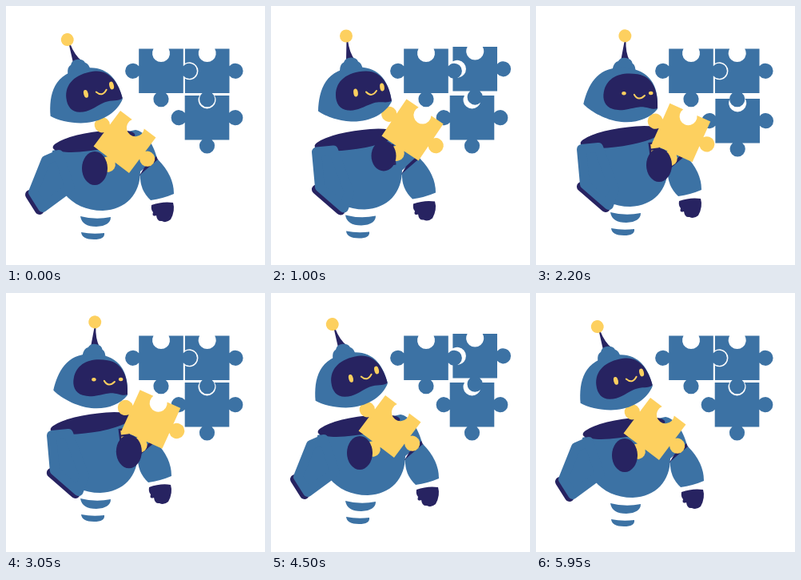
These frames come from a looping animation (324x324 px, 6000 ms). An HTML page:

```html
<!DOCTYPE html>
<html lang="en">
<head>
<meta charset="utf-8">
<title>Robot with puzzle</title>
<style>
  html, body { margin: 0; width: 100%; height: 100%; overflow: hidden; background: #fff; }
  svg { display: block; width: 100%; height: 100%; }
  .blue { fill: #3c72a4; }
  .navy { fill: #272361; }
  .gold { fill: #fdd05f; }
  #arm { stroke: #3c72a4; }
  #elbow { stroke: #272361; }
  #arm, #elbow { stroke-width: 12; stroke-linejoin: round; stroke-linecap: round; }
</style>
</head>
<body>
<svg viewBox="0 0 324 324">
  <g id="puzzle" class="blue"></g>
  <g id="robot">
    <g class="blue">
      <path d="M93 263Q112 268 131 264Q131 275 113 276Q95 276 93 263Z"/>
      <path d="M94 283Q108 286 123 284Q124 292 110 292Q95 292 94 283Z"/>
    </g>
    <g id="body">
      <path id="grip" class="navy" d="M182 249Q196 244 209 246Q212 256 206 267Q200 272 195 269Q189 270 188 262Q182 264 184 258Q181 255 182 249Z"/>
      <path class="blue" d="M58 181C56 225 80 256 121 256C150 255 168 235 168 207L189 190C184 172 174 157 162 155L110 166Z"/>
      <path class="navy" d="M167 212L173 202L188 188L192 196Q182 203 171 212Z"/>
      <path class="blue" d="M190 192Q210 212 210 235Q196 241 181 243Q167 230 168 211Q177 203 190 192Z"/>
      <ellipse class="navy" rx="52" ry="11.5" transform="translate(110 169) rotate(-9)"/>
      <g transform="translate(152 188) rotate(-7)">
        <rect class="navy" x="-7" y="-13" width="14" height="26"/>
        <g id="bars" class="gold"></g>
      </g>
    </g>
    <polyline id="elbow"/>
    <polygon id="arm" class="blue"/>
    <path id="held" class="gold"/>
    <ellipse id="hand" class="navy"/>
    <g id="head">
      <g id="antenna">
        <path class="navy" d="M94.5 44L96 44Q98 60 105 69L94 69Z"/>
        <circle class="gold" cx="94" cy="39" r="8"/>
      </g>
      <path class="blue" d="M86 83Q86 74 91 72Q93 66 100 66Q107 66 109 71Q114 73 115 82Z"/>
      <path class="blue" d="M59 133C60 106 68 79 108 78C136 77 148 97 151 121C143 136 125 146 103 146C88 146 68 140 59 133Z"/>
      <path class="navy" d="M81 113C81 95 95 84 118 83C138 82 148 100 151 120C145 124 138 120 128 123C114 128 108 133 96 132C86 131 81 123 81 113Z"/>
      <ellipse class="gold eye" rx="2.8" transform="translate(106 110) rotate(-8)"/>
      <ellipse class="gold eye" rx="2.8" transform="translate(139 103) rotate(-8)"/>
      <path d="M119 109Q126 116.5 132 107.5" fill="none" stroke="#fdd05f" stroke-width="2" stroke-linecap="round"/>
    </g>
  </g>
</svg>
<script>
const LOOP = 6000, HALF = 27.8;
const $ = id => document.getElementById(id);
const set = (el, attrs) => Object.entries(attrs).forEach(([k, v]) => el.setAttribute(k, v));
const move = (el, transform) => set(el, { transform });

function add(parent, tag, attrs) {
  const el = document.createElementNS('http://www.w3.org/2000/svg', tag);
  set(el, attrs);
  return parent.appendChild(el);
}

// Sides run top, right, bottom, left: 1 is a tab, -1 a notch.
function jigsaw(sides) {
  let d = `M${-HALF} ${-HALF}`;
  sides.forEach((kind, i) => {
    const spin = (x, y) => {
      for (let k = 0; k < i; k++) [x, y] = [-y, x];
      return `${x} ${y}`;
    };
    const [neck, r, sweep] = kind > 0 ? [6, 9.6, 1] : [9.5, 11, 0];
    d += `L${spin(-neck, -HALF)}A${r} ${r} 0 1 ${sweep} ${spin(neck, -HALF)}L${spin(HALF, -HALF)}`;
  });
  return d + 'Z';
}

// arm: shoulder, outer shoulder, elbow, wrist, inner side
// hand: x, y, radii; held and head: x, y, angle
const near = {
  arm: [[66, 186], [50, 193], [34, 233], [46, 252], [80, 227]],
  hand: [111, 203, 16, 21], held: [148.5, 170, 37],
  head: [-5.5, 0, -6], antenna: -8, lid: 0, body: 0, grip: [0, 0]
};
const reach = {
  arm: [[78, 182], [57, 184], [61, 228], [91, 254], [98, 235]],
  hand: [141, 189, 15.5, 19], held: [177, 156.5, 34],
  head: [0, 0, 0], antenna: 0, lid: 0, body: -4, grip: [0, 0]
};
const ponder = {
  ...reach, hand: [154, 204, 16, 21], held: [181.5, 163.5, 24],
  head: [3, 4, 11.5], antenna: -2, lid: 1, body: -3
};
const lowered = {
  arm: [[72, 182], [55, 180], [41, 226], [54, 260], [120, 251]],
  hand: [133, 241, 18.5, 18], held: [182, 228.5, 66],
  head: [-5, 2, 1], antenna: 4, lid: 0, body: -2, grip: [2, -13]
};
const keys = [
  [0, near], [430, reach], [1620, reach], [1920, ponder], [3040, ponder],
  [3260, lowered], [3860, lowered], [4220, near], [LOOP, near]
];

const ease = p => p * p * (3 - 2 * p);
function mix(a, b, p) {
  if (typeof a === 'number') return a + (b - a) * p;
  if (Array.isArray(a)) return a.map((v, i) => mix(v, b[i], p));
  return Object.fromEntries(Object.keys(a).map(k => [k, mix(a[k], b[k], p)]));
}
function poseAt(t) {
  const i = keys.findIndex(k => k[0] > t);
  const [[t0, a], [t1, b]] = [keys[i - 1], keys[i]];
  return mix(a, b, ease((t - t0) / (t1 - t0)));
}

// Each piece slides out and back in turn, twice per loop.
const pieces = [
  { at: [194, 81.3], out: [-7, -1], sides: [-1, 1, 1, 1] },
  { at: [251.7, 81.3], out: [7, -5], sides: [-1, 1, 1, -1] },
  { at: [251.5, 139.7], out: [1, 6], sides: [-1, 1, 1, 1] }
];
for (const piece of pieces) piece.el = add($('puzzle'), 'path', { d: jigsaw(piece.sides) });
for (let i = 0; i < 3; i++) add($('bars'), 'rect', { x: -4.5, y: 7.7 * i - 10.5, width: 10, height: 5.5 });
set($('held'), { d: jigsaw([-1, 1, 1, 1]) });
const eyes = document.querySelectorAll('.eye');

function render(t) {
  const { arm, hand, held, head, antenna, lid, body, grip } = poseAt(t);
  const [cx, cy, rx, ry] = hand;
  set($('arm'), { points: arm.join(' ') });
  set($('elbow'), { points: arm.slice(2, 4).map(([x, y]) => [x - 4, y + 3]).join(' ') });
  set($('hand'), { cx, cy, rx, ry });
  move($('robot'), `translate(0 ${-3 * (1 - Math.cos(2 * Math.PI * t / LOOP))})`);
  move($('body'), `translate(${body} 0)`);
  move($('grip'), `translate(${grip})`);
  move($('held'), `translate(${held[0]} ${held[1]}) rotate(${held[2]})`);
  move($('head'), `translate(${head[0]} ${head[1]}) rotate(${head[2]} 105 115)`);
  move($('antenna'), `rotate(${antenna} 100 68)`);
  eyes.forEach(eye => set(eye, { ry: 5 - 2.7 * lid }));
  pieces.forEach(({ el, at, out }, i) => {
    const p = (t % 3000 - 125) / 750 - i;
    const slide = p > 0 && p < 1 ? Math.sin(Math.PI * p) : 0;
    move(el, `translate(${at[0] + out[0] * slide} ${at[1] + out[1] * slide})`);
  });
}

const began = performance.now();
function tick() {
  render((performance.now() - began) % LOOP);
  requestAnimationFrame(tick);
}
tick();
</script>
</body>
</html>
```
